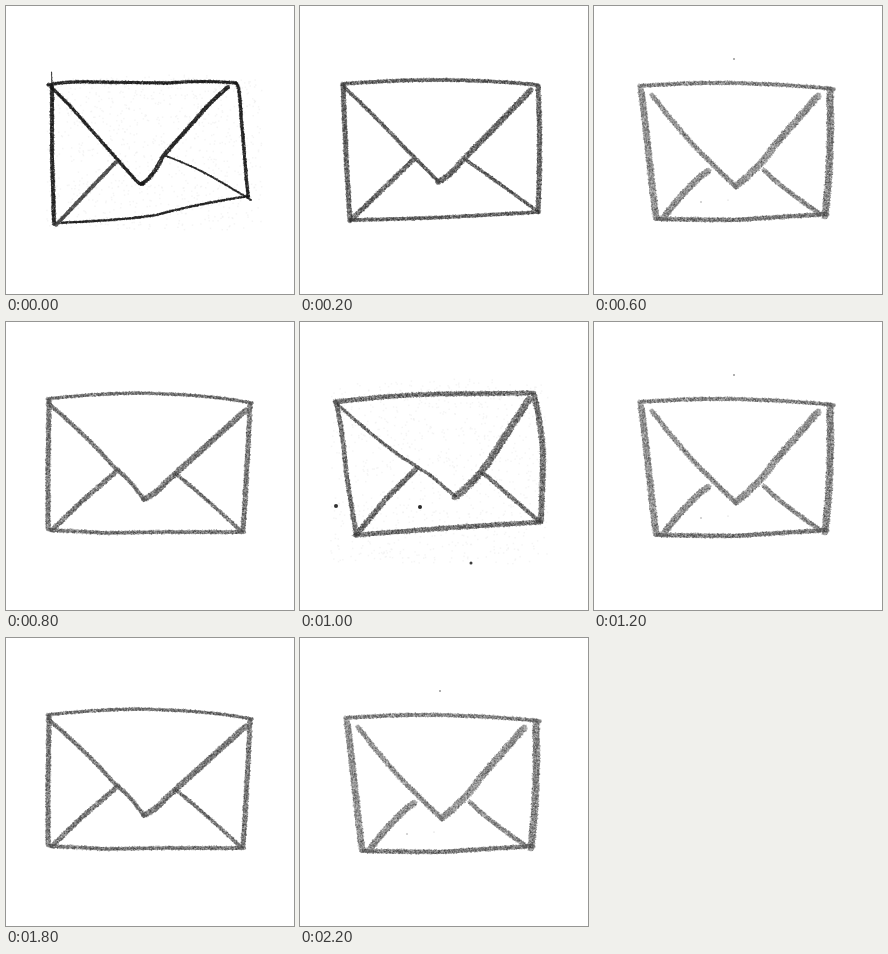
Recreate the animation shown at these times as an HTML page with a canvas. Size 288x288 px, loop 2.4 s.

```html
<!DOCTYPE html>
<html lang="en">
<head>
<meta charset="utf-8">
<title>Sketched envelope</title>
<style>
  html, body { margin: 0; width: 100%; height: 100%; overflow: hidden; background: #fff; }
  canvas { display: block; width: 288px; height: 288px; }
</style>
</head>
<body>
<canvas width="288" height="288"></canvas>
<script>
const SIZE = 288, STEP = 200;

// Each sketch: pencil tone, base opacity, strokes as [width, path], specks as [x, y, radius, tone].
const inked = {
  tone: 28, base: .85, paper: [40, 68, 255, 223],
  strokes: [
    [4, 'M42 79Q60 75 88 76L160 77Q200 74 230 77'],
    [5, 'M46 80L46 150L48 218'],
    [1, 'M45.5 66L46 80'],
    [4, 'M230 77Q234 80 235 110L242 191'],
    [3, 'M50 217Q120 214 150 209Q190 198 243 190'],
    [4, 'M45 81Q66 101 80 118L126 170Q133 179 137 178'],
    [5, 'M135 178Q146 173 157 150L190 113Q205 95 222 81'],
    [4.5, 'M110 156L83 184L50 219', 75],
    [2.4, 'M160 150Q190 161 215 176L245 194']
  ],
  specks: []
};

const even = {
  tone: 60, base: .6,
  strokes: [
    [4.5, 'M42 78Q90 74 135 74Q190 74 238 79'],
    [6, 'M43 79Q45 140 50 215'],
    [6, 'M238 80Q241 140 238 206'],
    [4.5, 'M50 214Q110 213 150 211L239 206'],
    [4.5, 'M44 81Q80 115 105 142L139 176'],
    [7, 'M138 176Q150 170 160 157L231 84'],
    [6, 'M113 154L85 181L52 213'],
    [4, 'M166 154Q195 174 237 205']
  ],
  specks: []
};

const wide = {
  tone: 62, base: .6,
  strokes: [
    [4, 'M27 76Q40 74 60 74L130 74Q180 76 228 76Q238 78 240 84'],
    [6, 'M35 78L42 130L46 168Q52 195 60 215'],
    [5, 'M240 80L242 120L240 160L239 206'],
    [4, 'M60 215Q110 211 150 211Q190 206 246 208'],
    [4, 'M35 77L90 126L132 163L139 172'],
    [6.5, 'M137 172Q145 175 152 163L195 118L233 83'],
    [7, 'M120 156L90 184L62 213'],
    [3, 'M160 154L195 178L242 208']
  ],
  specks: [[46, 169, 4.5, 60], [211, 122, 1, 205]]
};

const soft = {
  tone: 105, base: .5,
  strokes: [
    [5, 'M45 80Q100 76 140 77Q190 78 240 83', 85],
    [8, 'M47 84Q54 140 58 180L62 212'],
    [8.5, 'M236 84Q237 140 234 180L231 210', 85],
    [5.5, 'M62 213L140 214L232 208', 75],
    [6, 'M58 89Q85 125 110 150L142 181'],
    [8.5, 'M142 180Q165 162 180 140L224 90'],
    [8, 'M114 165Q95 178 70 211'],
    [5.5, 'M170 164Q185 180 226 208']
  ],
  specks: [[140, 53, 1, 150], [107, 196, .8, 160], [134, 194, .6, 200]]
};

const spotted = {
  tone: 68, base: .55, paper: [30, 56, 247, 241],
  strokes: [
    [6, 'M35 80Q90 73 140 72L234 71'],
    [5.5, 'M36 80Q43 110 46 150L56 212'],
    [7, 'M234 73Q243 110 243 140L241 199'],
    [6, 'M55 213Q110 209 160 205L241 200'],
    [4, 'M37 82Q70 112 100 134L130 153L156 175'],
    [8.5, 'M155 175Q175 160 190 138L229 77'],
    [6.5, 'M116 147L85 178L56 213'],
    [5, 'M182 150Q205 170 239 199']
  ],
  specks: [[36, 184, 2, 50], [120, 185, 2, 40], [171, 241, 1.5, 60]]
};

const boxy = {
  tone: 78, base: .55,
  strokes: [
    [4, 'M41 77Q80 72 130 71Q200 72 246 81'],
    [6, 'M43 79L42 140L42 207'],
    [6, 'M244 82Q241 150 237 208'],
    [5, 'M44 208L100 211L160 210L238 210'],
    [5, 'M42 81Q85 118 108 145Q125 158 138 178'],
    [7, 'M138 177Q150 172 160 160L240 88'],
    [6, 'M112 148L75 180L46 208'],
    [4.5, 'M170 152Q195 172 235 209']
  ],
  specks: []
};

const order = [inked, even, wide, soft, boxy, spotted, soft, wide, inked, boxy, even, soft];

function seeded(seed) {
  return () => (seed = seed * 16807 % 2147483647) / 2147483647;
}

const grey = (v, alpha = 1) => `rgba(${v},${v},${v},${alpha})`;

function pencil(c, rand, width, d, tone, base) {
  c.strokeStyle = grey(tone, base);
  c.lineWidth = width * .75;
  c.stroke(new Path2D(d));
  const path = document.createElementNS('http://www.w3.org/2000/svg', 'path');
  path.setAttribute('d', d);
  const length = path.getTotalLength();
  for (let s = 0; s < length; s += .7) {
    const p = path.getPointAtLength(s);
    // Grain: mostly dark dabs, with pale gaps where the paper shows through
    for (let i = 0; i < width * .8; i++) {
      const angle = rand() * 7, r = Math.sqrt(rand()) * width * .47;
      const gap = rand() < (1 - base) * .3;
      c.fillStyle = gap ? grey(225, .5) : grey(Math.round(tone * (.45 + rand() * .8)), .45);
      c.fillRect(p.x + Math.cos(angle) * r - .5, p.y + Math.sin(angle) * r - .5, 1, 1);
    }
  }
}

function render(sketch) {
  const canvas = document.createElement('canvas');
  canvas.width = canvas.height = SIZE;
  const c = canvas.getContext('2d'), rand = seeded(4711);
  c.fillStyle = '#fff';
  c.fillRect(0, 0, SIZE, SIZE);
  c.lineCap = c.lineJoin = 'round';
  if (sketch.paper) {
    const [x0, y0, x1, y1] = sketch.paper;
    c.fillStyle = grey(235, .5);
    for (let i = 0; i < 900; i++) c.fillRect(x0 + rand() * (x1 - x0), y0 + rand() * (y1 - y0), 1.4, 1.4);
  }
  for (const [width, d, tone = sketch.tone] of sketch.strokes) pencil(c, rand, width, d, tone, sketch.base);
  for (const [x, y, r, tone] of sketch.specks) {
    c.fillStyle = grey(tone);
    c.beginPath();
    c.arc(x, y, r, 0, Math.PI * 2);
    c.fill();
  }
  return canvas;
}

const images = new Map([...new Set(order)].map(s => [s, render(s)]));
const stage = document.querySelector('canvas').getContext('2d');
const start = performance.now();

function draw(now) {
  const i = Math.floor(Math.max(0, now - start) / STEP) % order.length;
  stage.drawImage(images.get(order[i]), 0, 0);
  requestAnimationFrame(draw);
}
draw(start);
</script>
</body>
</html>
```
